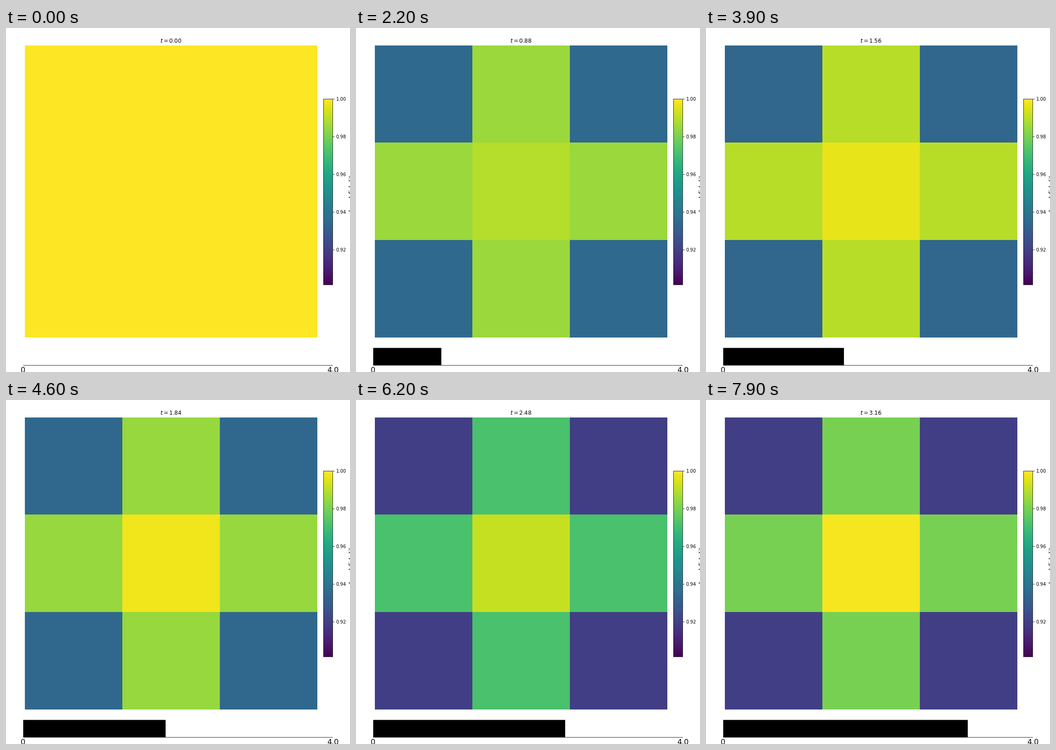
A matplotlib script for the animation above (8 s loop, 748 by 748 pixels).

```python
import numpy as np
import matplotlib.pyplot as plt
from matplotlib.animation import FuncAnimation
from matplotlib.patches import Rectangle

SIZE = 748
FRAMES = 80
T_END = 4.0
VMIN, VMAX = 0.9016, 1.0

plt.rcParams["font.family"] = "DejaVu Sans"
plt.rcParams["mathtext.fontset"] = "dejavusans"

fig = plt.figure(figsize=(SIZE / 72, SIZE / 72), dpi=72, facecolor="white")


def px_axes(x0, y0, x1, y1):
    """Axes from pixel corners, y counted from the top."""
    box = [x0 / SIZE, 1 - y1 / SIZE, (x1 - x0) / SIZE, (y1 - y0) / SIZE]
    return fig.add_axes(box)


def corner_loss(t):
    return 0.0915 * np.sin(4.623 * t) ** 2 + 0.0075 * (1 - np.exp(-2 * t))


def edge_loss(t):
    own = (0.016 + 0.0135 * np.exp(-8 * t**2)) * np.sin(8.2 * t) ** 2
    driven = 0.0155 * (1 - np.exp(-t**4)) * np.sin(4.623 * t) ** 2
    return own + driven


def center_loss(t):
    fast = 0.0125 * np.exp(-0.1 * t) * np.sin(11.9 * t) ** 2
    return fast + 0.003 * np.sin(1.2 * t) ** 2


def lattice(t):
    c, e, m = corner_loss(t), edge_loss(t), center_loss(t)
    return 1 - np.array([[c, e, c], [e, m, e], [c, e, c]])


# Lattice
ax = px_axes(41, 38, 677, 673)
ax.axis("off")
cells = ax.imshow(lattice(0), cmap="viridis", vmin=VMIN, vmax=VMAX,
                  interpolation="nearest", aspect="auto")

# Colour bar
cax = px_axes(690.2, 153.9, 710.4, 557.9)
cbar = fig.colorbar(cells, cax=cax, ticks=[0.92, 0.94, 0.96, 0.98, 1.0],
                    format="%.2f")
cbar.ax.tick_params(labelsize=10, width=0.8, length=3.5, pad=3.5)
cbar.outline.set_linewidth(0.8)

# Stage in pixels for the title, the cut-off label and the time bar
stage = px_axes(0, 0, SIZE, SIZE)
stage.set(xlim=(0, SIZE), ylim=(SIZE, 0))
stage.axis("off")
stage.patch.set_alpha(0)

title = stage.text(359, 31.5, "", size=12, ha="center", va="baseline")
stage.text(758, 355, "local fidelity", size=14.5, rotation=90, ha="center",
           va="baseline", rotation_mode="anchor")

X0, X1 = 0.05 * SIZE, 0.95 * SIZE
TOP, BASE = 0.93 * SIZE, 0.98 * SIZE
bar = stage.add_patch(Rectangle((X0, TOP), 0, BASE - TOP, fc="black", lw=0,
                                snap=False))
stage.plot([X0, X1], [BASE + 0.5] * 2, color="black", lw=0.8, snap=False,
           solid_capstyle="butt")
for x, label in ((X0, "0"), (X1, "4.0")):
    stage.text(x, 748.8, label, size=16, ha="center", va="baseline")


def update(i):
    t = i * 0.04
    cells.set_data(lattice(t))
    title.set_text(f"$t = {t:.2f}$")
    bar.set_width((X1 - X0) * t / T_END)
    return cells, title, bar


anim = FuncAnimation(fig, update, frames=FRAMES, interval=100,
                     repeat=True, repeat_delay=0, blit=False)
plt.show()
```
